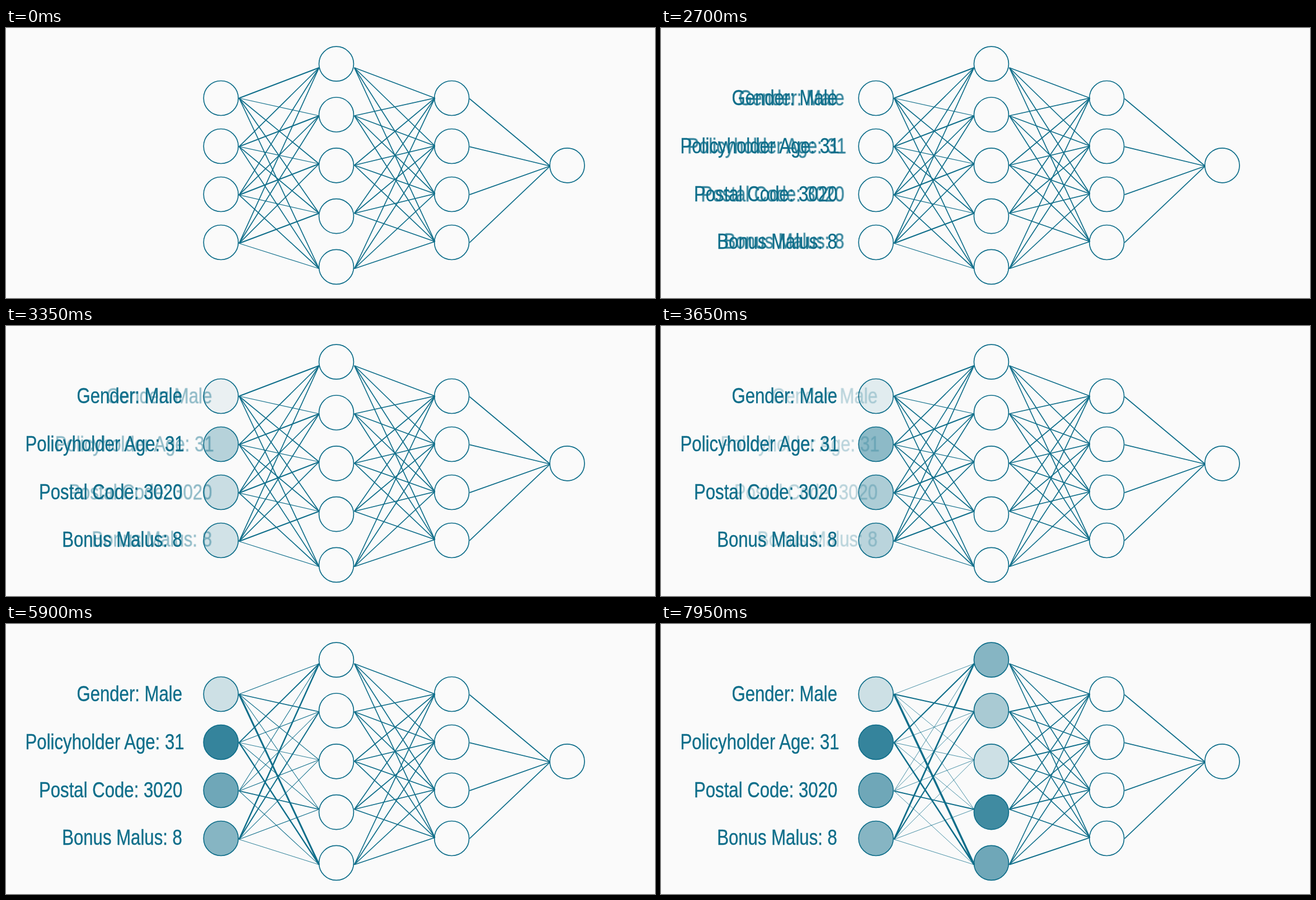
These frames come from a looping animation (1160 by 483 pixels, 8000 ms). An HTML page:

```html
<!DOCTYPE html>
<html lang="en">
<head>
<meta charset="utf-8">
<title>Neural network</title>
<style>
  html, body { margin: 0; width: 100%; height: 100%; overflow: hidden; background: #fafafa; }
  svg { display: block; width: 100%; height: 100%; }
  line, circle { stroke: #0f6e8a; stroke-width: 1.7; }
  circle { fill: #0f6e8a; fill-opacity: 0; }
  text {
    fill: #0f6e8a; stroke: #0f6e8a; stroke-width: 0.4;
    font: 38px "Liberation Sans", Arial, sans-serif; white-space: pre;
  }
</style>
</head>
<body>
<svg id="stage" viewBox="0 0 1160 483"></svg>
<script>
const LOOP = 8000, STEP = 50, RADIUS = 31;
const NARROW = 0.82; // condensed letterforms
const stage = document.getElementById('stage');

function add(parent, tag, attrs = {}, content = '') {
  const el = document.createElementNS('http://www.w3.org/2000/svg', tag);
  for (const key in attrs) el.setAttribute(key, attrs[key]);
  el.textContent = content;
  return parent.appendChild(el);
}

const progress = (t, start, end) => Math.min(1, Math.max(0, (t - start) / (end - start)));
const mix = (a, b, p) => a + (b - a) * p;
const spread = (first, gap, count) => Array.from({ length: count }, (_, i) => first + gap * i);

// Width rules take the index of the node a line leaves and of the node it enters.
const even = () => 1.7;
const inputStart = (i, j) => i === j ? 2 : j === i + 1 ? 1.2 : 1.7;
const strongLinks = { '0-4': 3.5, '3-0': 2.8, '1-4': 2.6, '1-0': 2.1, '3-1': 2.1, '0-1': 2, '2-3': 1.9 };
const inputEnd = (i, j) => strongLinks[`${i}-${j}`] ?? 0.75;
const hiddenEnd = (i, j) => i - j === 1 ? 2.8 : 1.2;

const lineGroup = add(stage, 'g', { transform: 'translate(0.6 0.5)' });

function connect(x1, starts, x2, ends, from = even, to = from) {
  return starts.flatMap((y1, i) => ends.map((y2, j) => ({
    el: add(lineGroup, 'line', { x1, y1, x2, y2 }),
    from: from(i, j),
    to: to(i, j)
  })));
}

function layer(cx, ys, strengths = []) {
  return ys.map((cy, i) => ({
    el: add(stage, 'circle', { cx, cy, r: RADIUS }),
    strength: strengths[i] ?? 0
  }));
}

const hiddenPorts = middle => [70.5, 156.5, middle, 331, 430];
const inputLines = connect(416, spread(125, 86.6, 4), 559, hiddenPorts(242.5), inputStart, inputEnd);
const hiddenLines = connect(622, hiddenPorts(245), 766, spread(124.8, 85.6, 4), even, hiddenEnd);
connect(828, spread(126, 85.8, 4), 972, [246.5]);

const rows = spread(125.5, 86, 4);
const inputs = layer(384.2, rows, [0.19, 0.835, 0.59, 0.495]);
const hidden = layer(590.4, spread(64.2, 90.8, 5), [0.495, 0.345, 0.19, 0.79, 0.59]);
layer(796.7, rows);
layer(1003, [245.8]);

const labels = [
  ['Gender: Male', 126.4, 138.3],
  ['Policyholder Age: 31', 34.6, 224.3],
  ['Postal Code: 3020', 59, 310.3],
  ['Bonus Malus: 8', 100.2, 394.5]
];

function labelGroup() {
  const group = add(stage, 'g');
  for (const [text, x, y] of labels)
    add(group, 'text', { transform: `translate(${x} ${y}) scale(${NARROW} 1)` }, text);
  return group;
}
const fixedLabels = labelGroup();
const flyingLabels = labelGroup();

const setWidths = (lines, p) =>
  lines.forEach(l => l.el.style.strokeWidth = mix(l.from, l.to, p));
const setFills = (nodes, p) =>
  nodes.forEach(n => n.el.style.fillOpacity = n.strength * p);

function draw(t) {
  fixedLabels.setAttribute('opacity', progress(t, 400, 950));

  const flight = progress(t, 2500, 4100);
  flyingLabels.setAttribute('opacity', flight > 0 ? 1 - flight : 0);
  flyingLabels.setAttribute('transform', `translate(${100 * flight} 0)`);

  setFills(inputs, progress(t, 2840, 4300));
  setWidths(inputLines, progress(t, 4600, 6400));
  setFills(hidden, progress(t, 6350, 7500));
  setWidths(hiddenLines, progress(t, 7700, 9500));
}

const begin = performance.now();
function tick() {
  const t = (performance.now() - begin) % LOOP;
  draw(Math.floor(t / STEP) * STEP);
  requestAnimationFrame(tick);
}
tick();
</script>
</body>
</html>
```
